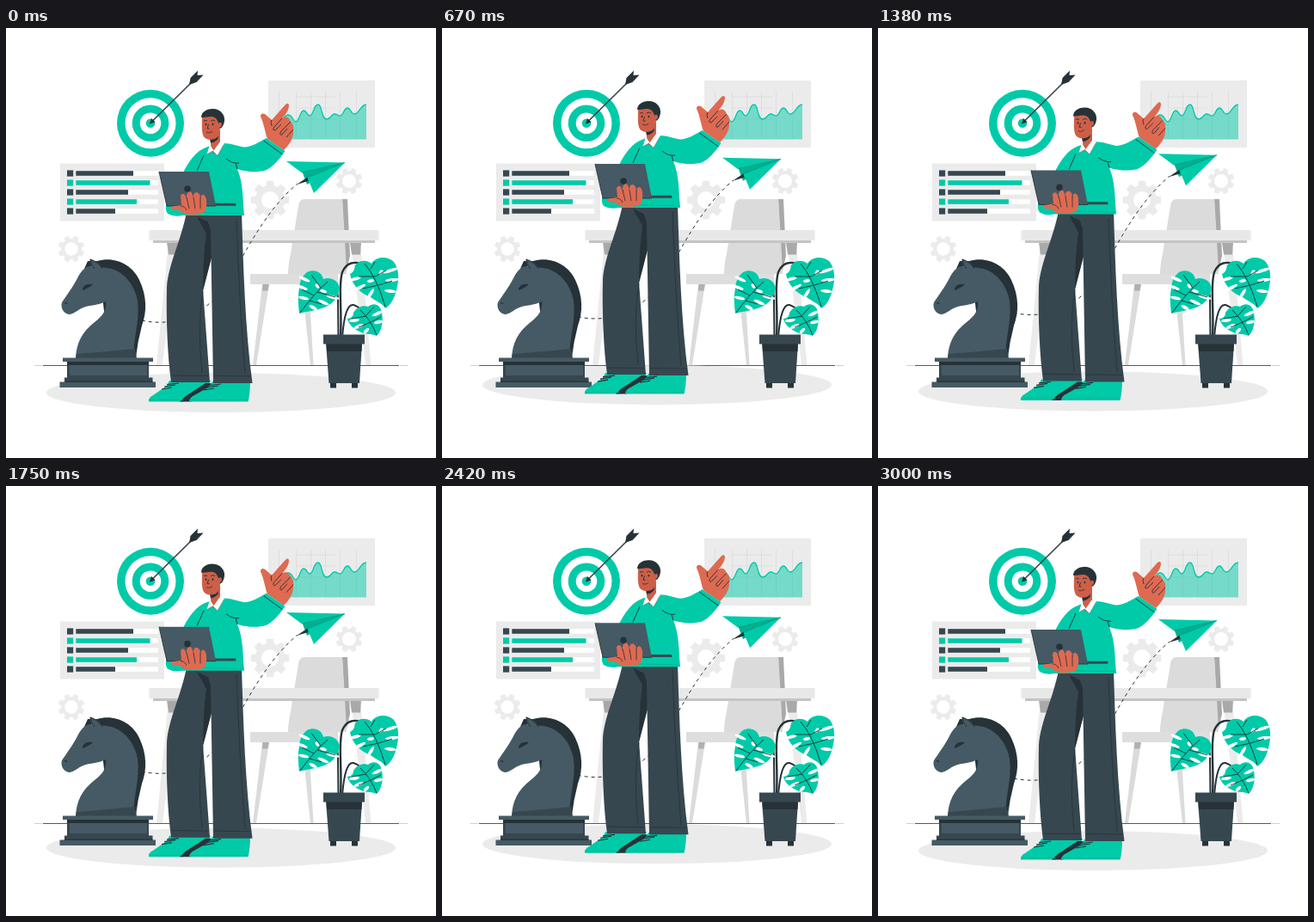
Recreate the animation shown at these times as an HTML page with a canvas. Size 500 px wide and 500 px high, loop 3040 ms.

```html
<!DOCTYPE html>
<html lang="en">
<head>
<meta charset="utf-8">
<title>Strategy illustration</title>
<style>
html, body { margin: 0; width: 100%; height: 100%; overflow: hidden; background: #fff; }
canvas { display: block; width: 100vw; height: 100vh; }
</style>
</head>
<body>
<canvas id="stage"></canvas>
<script>
const LOOP = 3040, CYCLE = 3000;
const GREEN = '#00caa8', GREEN_DEEP = '#00b091', INK = '#263238', SLATE = '#37474f', STEEL = '#455a64';
const SKIN = '#de6a52', FACE = '#cd5f48', LIP = '#7d3832';
const PALE = '#ebebeb', GREY = '#dbdbdb', SHADE = '#b0b0b0';

const canvas = document.getElementById('stage');
const ctx = canvas.getContext('2d');

function fill(d, color) {
  ctx.fillStyle = color;
  ctx.fill(new Path2D(d));
}

function line(d, color = INK, width = 1) {
  ctx.strokeStyle = color;
  ctx.lineWidth = width;
  ctx.stroke(new Path2D(d));
}

function rect(x0, y0, x1, y1, color) {
  ctx.fillStyle = color;
  ctx.fillRect(x0, y0, x1 - x0, y1 - y0);
}

function oval(x, y, rx, ry, color, turn = 0) {
  ctx.fillStyle = color;
  ctx.beginPath();
  ctx.ellipse(x, y, rx, ry, turn, 0, Math.PI * 2);
  ctx.fill();
}

function shifted(dy, draw) {
  ctx.save();
  ctx.translate(0, dy);
  draw();
  ctx.restore();
}

function gear(x, y, r, hole, turn) {
  const root = r * 0.77, teeth = 8, step = Math.PI * 2 / teeth;
  const tooth = [[-0.27, root], [-0.18, r], [0.18, r], [0.27, root]];
  ctx.beginPath();
  for (let i = 0; i < teeth; i++) {
    const a = i * step + turn;
    for (const [da, q] of tooth) ctx.lineTo(x + q * Math.cos(a + da), y + q * Math.sin(a + da));
  }
  ctx.closePath();
  ctx.moveTo(x + hole, y);
  ctx.arc(x, y, hole, 0, Math.PI * 2, true);
  ctx.fillStyle = PALE;
  ctx.fill('evenodd');
}

function drawTarget() {
  [39, 29.5, 21.3, 12.3, 5.3].forEach((r, i) => oval(168, 110.7, r, r, i % 2 ? '#fff' : GREEN));
  line('M170 108.5L217 62', SLATE, 1.7);
  fill('M167 111.5L169 105L173.5 109.5Z', INK);
  fill('M213 66L214.5 58L223 49.5L222.5 55L229.5 54.5L221.5 63Z', INK);
}

function drawChart() {
  rect(305, 61, 429, 139, PALE);
  let grid = '';
  for (const x of [317.5, 337.5, 354.5, 371.5, 388.5, 407.5]) grid += `M${x} 74V129`;
  for (const y of [80, 93, 106]) grid += `M337 ${y}H384`;
  line(grid, '#d9d9d9', 0.7);
  const curve = 'M317 110C321 110 323 101 328 101C333 101 334 109 337 109C341 109 342 96 346 96C350 96 350 102 353 102' +
    'C358 102 357 89 363 89C368 89 366 106 373 106C378 106 378 100 382 100C386 100 386 103 389 102C393 100 393 93 397 93' +
    'C401 93 401 100 405 100C411 100 412 89 419 89';
  ctx.globalAlpha = 0.5;
  fill(curve + 'V129.5H317Z', GREEN);
  ctx.globalAlpha = 1;
  line(curve, GREEN, 1.3);
}

function drawBars() {
  rect(63, 157.5, 184, 224.5, PALE);
  [148, 167.5, 142, 152, 127].forEach((end, i) => {
    const y = 169 + i * 11, color = i % 2 ? GREEN : SLATE;
    rect(71, y - 3.6, 78.2, y + 3.6, color);
    rect(81.3, y - 2.8, 177, y + 2.8, '#fff');
    rect(81.3, y - 2.8, end, y + 2.8, color);
  });
}

function drawRoom() {
  rect(43, 392, 457, 392.8, INK);
  rect(33, 392, 42, 392.6, SHADE);
  rect(458, 392, 467, 392.6, SHADE);
  gear(307, 200, 22.5, 10, 0);
  gear(399, 178, 15.5, 8, Math.PI / 8);
  gear(76, 257, 15.5, 7.7, Math.PI / 8);
  // chair
  fill('M391 199H397L400 265L395 286Z', '#a9a9a9');
  fill('M347 199H391Q394 240 396 286H328Q328 276 331 262L340 207Q341 199 347 199Z', GREY);
  // desk
  fill('M189 249H199L182 392H175Z', PALE);
  fill('M187 249H200.5L196.5 263.5H189Z', '#a9a9a9');
  fill('M401 249H412L424.5 392H418Z', PALE);
  fill('M400 249H413L412 263.5H402Z', '#a9a9a9');
  rect(171, 246, 429, 250, '#c4c4c4');
  rect(166.5, 235, 433.5, 247, '#e8e8e8');
  // seat and legs
  fill('M298 298H306L291 392H287Z', GREY);
  fill('M344 298H352L357.5 392H354Z', GREY);
  fill('M298.5 297H306L304.5 305.5H298Z', SHADE);
  rect(284, 286, 386, 298, '#dedede');
}

function drawHorse() {
  fill('M91 280L95 271L106 271C126 265 147 275 155 293C164 312 164 330 158 346Q153 365 151 383H120L108 275Z', INK);
  fill('M96 277L105 279C128 275 148 291 153 317C156 340 148 361 148 384H81C82 366 88 354 103 342' +
    'C112 335 117 329 116 318C107 323 97 322 90 325C84 327 79 333 73 333C67 332 63 325 65 319' +
    'C72 309 79 299 83 291C86 285 90 279 96 277Z', STEEL);
  fill('M97.5 268.5Q108 271 113 281L102 281Q98 276 97.500 268.5Z', STEEL);
  line('M98 269Q107 272 112 280M98 269Q99 276 103 280', INK, 0.9);
  fill('M89 303Q91 297 101 298Q97 302 89 305Z', INK);
  line('M68 320Q70 319 71 321', INK, 1.2);
  fill('M81 384L82 379Q120 376 150 373L152 384Z', SLATE);
  rect(71, 388, 166, 408, SLATE);
  rect(71, 388, 166, 392, INK);
  rect(74, 392, 164, 404, STEEL);
  rect(66, 383.5, 171, 388, STEEL);
  rect(68, 406.5, 170.5, 412, SLATE);
  rect(62.5, 411.5, 174, 418, STEEL);
  rect(68, 410.6, 170.5, 411.8, INK);
}

function leaf(outline, slits, rib) {
  fill(outline, GREEN);
  for (const [x, y, rx, turn] of slits) oval(x, y, rx, 1.9, '#fff', turn);
  line(rib, INK, 0.9);
}

function drawPlant() {
  line('M386.5 360L386 315Q385 292 371 293', INK, 2);
  line('M389 360C391 325 386 300 391 284Q398 267 419 276', INK, 2.4);
  line('M391 360Q394 320 404 322Q411 324 415 331', INK, 2);
  leaf('M406 276C410 270 419 269 425 274C430 265 444 265 451 272C457 280 457 292 455 300C453 311 449 321 441 326' +
    'C438 320 430 318 424 313C413 309 402 299 400 286Q405 284 406 276Z',
    [[447, 282, 9, -0.3], [449, 293, 8, -0.1], [447, 306, 7, 0.1], [405, 292, 8, -0.25],
     [411, 302, 8, -0.5], [424, 309, 7, -1], [436, 284, 3, -0.8], [424, 294, 4, -0.2]],
    'M417 274Q431 290 441 324M424 280L429 272M429 289L442 282M433 299L449 294M429 289L410 289M433 299L415 303');
  leaf('M350 284C358 280 367 283 369 292C377 289 386 293 388 302C387 314 378 323 367 326C357 329 347 330 341 332' +
    'C340 322 339 312 341 303Q341 291 350 284Z',
    [[347, 292, 7, 0.4], [345, 302, 6, 0.35], [346, 314, 6, 0.2], [380, 313, 8, 0.25],
     [369, 319, 7, 0.4], [357, 325, 5, 0.5], [362, 300, 3, 1], [369, 306, 4, 0.3]],
    'M374 295Q359 308 342 331M366 302L355 287M358 311L344 304M362 307L383 313M353 317L367 321');
  leaf('M404 331C408 324 416 322 421 324C428 318 436 322 437 331C439 341 437 352 431 358C425 355 417 357 409 352' +
    'C402 348 398 343 397 338Q404 337 404 331Z',
    [[432, 332, 7, -0.4], [433, 342, 5, -0.2], [405, 340, 6, -0.15], [410, 347, 6, -0.4], [419, 352, 4, -0.8]],
    'M412 328Q424 339 431 357M419 334L428 324M424 342L436 336M419 335L402 338M424 342L410 348');
  rect(377, 411, 384, 418.5, INK);
  rect(402, 411, 409, 418.5, INK);
  fill('M372 366H414L411 413H375.5Z', SLATE);
  fill('M372.5 367H414L413.5 376H373Z', INK);
  rect(369, 356.5, 417, 367.5, SLATE);
}

function drawPlane() {
  ctx.setLineDash([4, 4]);
  line('M150 338C198 352 240 330 264 286C287 243 309 206 339 181', INK, 1);
  ctx.setLineDash([]);
  fill('M394 156.5L344 166L350 182Z', GREEN_DEEP);
  fill('M326 155L394 156.5L343.5 168Z', GREEN);
  fill('M394 156.5L350.5 174L358 192Z', GREEN);
  fill('M338 182L350.5 173.5L351.5 178Z', INK);
  line('M394 156.5L343.5 168M394 156.5L350.5 174', '#078b76', 0.5);
}

function drawLegs() {
  // shoes
  fill('M190 410H238L234 418L206 434.5H166Q165 430 171 427L187 416Z', GREEN);
  fill('M202 434.5L209 428L232 413H240L242 417L215 434.5Z', INK);
  fill('M241 410H284Q284 425 281.5 434.5H213Q213 430 219 427L235 418Z', GREEN);
  line('M166 432.5H206M214 432.5H282', GREEN_DEEP, 0.7);
  line('M184 417L197 415M187 414.5L201 413M181 420L193 418M233 418L247 416M236 415.5L250 414M230 421L242 419', INK, 1.2);
  // trousers
  fill('M210 214H248L240 262L229 304L237 412H192C188 382 186 340 187 301C189 274 204 246 210 214Z', SLATE);
  fill('M222 219L242 229L239 267L229 306Q229 268 233 239Z', INK);
  fill('M231 214H274C276 278 278 350 286.5 413H241L238 235Z', SLATE);
  line('M193 404L236 404.5M242 404.5L285 405M268 222Q271 315 278 402M229 306Q222 347 228 401M224 222Q228 232 237 234', INK, 0.8);
}

function drawTorso() {
  fill('M238 137C225 140 216 149 207 166L191 205L206 218L277 218C275 196 276 181 269 164C281 168 294 168 303 165' +
    'Q313 160 324.5 143L302.5 128C294 133 285 138.5 277 138.5C268 137 260 133.5 252 134Z', GREEN);
  fill('M187 204Q184 210 188 216Q197 221 209 217L218 206Z', GREEN);
  line('M256 152Q263 158 271 157M269 164L267 157M299.5 131L321.5 147M230 148L222 166', INK, 0.9);
  line('M206 214L276 216', GREEN_DEEP, 0.7);
}

function drawPointer() {
  fill('M304 129C301 121 300 111 296 103Q296 98 301 100L309 107L325 89Q329 86 329 91Q328 98 321 105' +
    'C327 101 330 106 331 109Q335 112 334 119C335 128 329 136 323 142Z', SKIN);
  line('M309 107Q307 109 309 114M321 105L312 115Q309 119 313 119L320 112M331 109L320 120Q317 125 321 124L327 117' +
    'M334 118L326 127', INK, 0.9);
}

function drawHead() {
  fill('M237 122L249 119L249 135Q247 142 241 146Q238 141 238 135Z', FACE);
  fill('M237 129Q244 129 247 124.5L246.500 129Q242 133.5 238 133.5Z', INK);
  fill('M228 103Q229 98 241 98L250 106Q253 110 249 116Q249 125 244 128.5Q235 132 230 126.5' +
    'C227 121 228 112 228 103Z', FACE);
  fill('M227 104C227 98 233 93.5 241 94C249 94 255 101 254 108Q253 115 249 117Q248 111 246 108Q244 103 238 103' +
    'Q231 104 227 104Z', INK);
  oval(249, 112.5, 1.9, 2.8, FACE);
  oval(232.5, 112, 0.9, 1.3, INK);
  oval(240.5, 112, 0.9, 1.3, INK);
  line('M230 108Q232 107 234 108M238 108Q241 106 243 108M235.5 112L234 117H236.5', INK, 0.9);
  line('M233 121Q237 123 240 120', LIP, 1.1);
  fill('M237 135.5L233.5 147L240.5 143L246 148.5L254 134.5L249 132L241.5 142.500Z', '#fff');
  line('M233.5 147L240.5 143L246 148.5L253 135.5', INK, 0.4);
}

function drawLaptop() {
  fill('M239 203.8H267L267.5 206.8H239Z', SLATE);
  fill('M178 167H236L244 207H187Z', STEEL);
  line('M178 167L187 207H244', INK, 0.9);
  oval(211, 187, 3.8, 3.8, INK);
  // gripping hand
  fill('M192 211Q191 207 197 207L204 206L203 195Q205 191 208 194L210 199Q209 191 214 190Q217 191 218 199' +
    'Q217 191 222 191Q226 192 226 199Q227 193 230 194Q234 196 233 208L231 214Q224 218 211 217Q205 216 202 212Z', SKIN);
  line('M210 197L213 210M218 197L220 210M226 197L226 210M203 207Q208 207 210 212', INK, 0.8);
}

function drawMan() {
  drawLegs();
  drawPointer();
  drawTorso();
  drawHead();
  drawLaptop();
}

// Linear rise and fall: 0 at the ends of a period, 1 in the middle.
function bob(t, period) {
  return 1 - Math.abs(1 - 2 * ((t / period) % 1));
}

function draw(time) {
  const t = Math.min(time, CYCLE);
  const manY = -10 * bob(t, CYCLE / 2);
  const planeY = -9.5 * bob(t, CYCLE);

  ctx.setTransform(canvas.width / 500, 0, 0, canvas.height / 500, 0, 0);
  ctx.clearRect(0, 0, 500, 500);
  ctx.lineJoin = 'round';

  drawRoom();
  drawTarget();
  drawChart();
  drawBars();
  shifted(manY, () => oval(250, 424, 203, 23, PALE));
  shifted(planeY, drawPlane);
  drawHorse();
  drawPlant();
  shifted(manY, drawMan);
}

function resize() {
  const dpr = window.devicePixelRatio || 1;
  canvas.width = Math.round(innerWidth * dpr);
  canvas.height = Math.round(innerHeight * dpr);
}

const start = performance.now();

function frame(now) {
  draw(Math.max(0, now - start) % LOOP);
  requestAnimationFrame(frame);
}

addEventListener('resize', resize);
resize();
draw(0);
requestAnimationFrame(frame);
</script>
</body>
</html>
```
